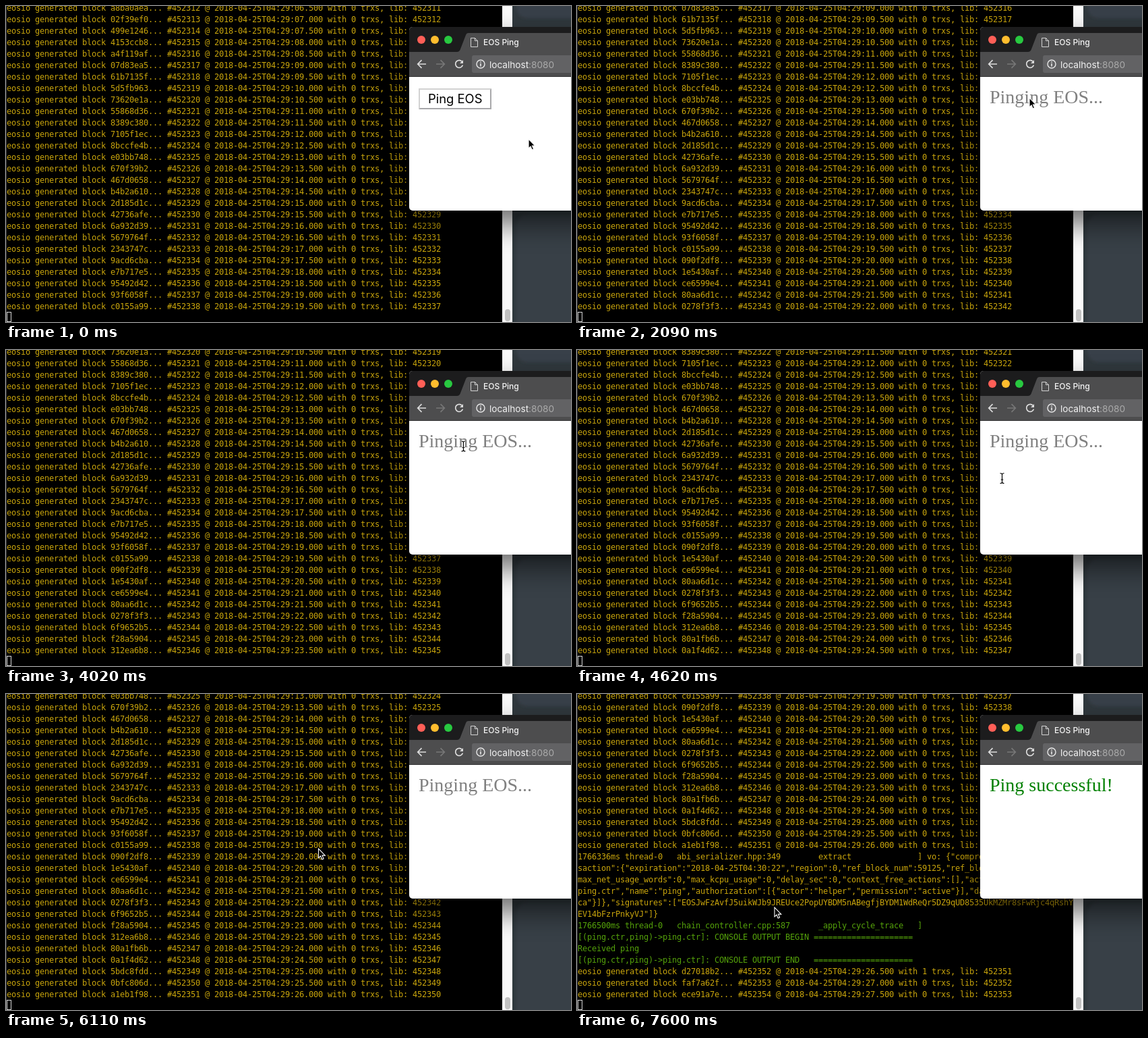
These frames come from a looping animation (838 px wide and 468 px high, 8 s). An HTML page:

```html
<!DOCTYPE html>
<html lang="en">
<head>
<meta charset="utf-8">
<title>Ping</title>
<style>
  html, body { margin: 0; width: 100%; height: 100%; overflow: hidden; background: #000; }
  svg { display: block; width: 838px; height: 468px; }
  text { white-space: pre; }
  .log { font: 12px "DejaVu Sans Mono", monospace; }
  .ui { font-family: Inter, Roboto, sans-serif; }
  .page { font: 28px "Liberation Serif", serif; }
</style>
</head>
<body>
<svg viewBox="0 0 838 468" xmlns="http://www.w3.org/2000/svg">
  <defs>
    <filter id="shade" x="-50%" y="-50%" width="200%" height="200%"><feGaussianBlur stdDeviation="20"/></filter>
    <filter id="soft"><feGaussianBlur stdDeviation="2"/></filter>
    <clipPath id="term"><rect width="736" height="468"/></clipPath>
  </defs>

  <!-- desktop -->
  <rect x="750" width="88" height="468" fill="#30383d"/>
  <rect x="757" y="-60" width="140" height="78" rx="16" fill="#394148" filter="url(#soft)"/>
  <rect x="756" y="309" width="140" height="220" rx="18" fill="#373f46" filter="url(#soft)"/>

  <!-- terminal -->
  <rect width="736" height="468"/>
  <rect width="1" height="468" fill="#3c3c3c"/>
  <g id="rows" class="log" clip-path="url(#term)"></g>
  <rect x="1.5" y="453.5" width="6" height="14" fill="none" stroke="#d8d8d8"/>
  <rect x="736" width="15" height="468" fill="#fafafa"/>
  <rect x="740" y="449" width="8" height="18" rx="4" fill="#c1c1c1"/>

  <!-- browser -->
  <rect x="598" y="51" width="330" height="272" opacity=".56" filter="url(#shade)"/>
  <rect x="598" y="31" width="260" height="272" rx="5" fill="#fff"/>
  <path d="M598 105V36a5 5 0 0 1 5-5H838V105Z" fill="#1c1c1d"/>
  <path d="M598 68H669Q672 68 673.5 65L682 43Q683 40 686 40H838V105H598Z" fill="#4d4d4e"/>
  <rect x="598" y="104" width="240" height="1" fill="#333"/>
  <circle cx="616" cy="50" r="6" fill="#ff5f57"/>
  <circle cx="636" cy="50" r="6" fill="#ffbd2e"/>
  <circle cx="656" cy="50" r="6" fill="#28c940"/>
  <path d="M689.5 47.5H695.5L699.5 51.5V60.5H689.5ZM695.5 47.5V51.5H699.5" fill="none" stroke="#d2d2d2"/>
  <text class="ui" x="708" y="58" font-size="12" font-weight="500" fill="#f4f4f4">EOS Ping</text>
  <g fill="none" stroke="#dcdcdc" stroke-width="1.7">
    <path d="M623 86H611M616.5 80.2L610.7 86L616.5 91.8"/>
    <path d="M638 86H650M644.5 80.2L650.3 86L644.5 91.8" stroke="#777"/>
    <path d="M676.3 82.2A5.5 5.5 0 1 0 677.4 87.5"/>
    <path d="M678 80V85H673Z" fill="#dcdcdc" stroke="none"/>
  </g>
  <path d="M838 73H694a3 3 0 0 0-3 3V96a3 3 0 0 0 3 3H838Z" fill="#626264"/>
  <circle cx="704" cy="86" r="6" fill="none" stroke="#e8e8e8" stroke-width="1.4"/>
  <path d="M704 85V89.5M704 82.2V83.8" stroke="#e8e8e8" stroke-width="1.6"/>
  <text class="ui" x="717" y="91.5" font-size="13.6" fill="#f2f2f2">localhost<tspan fill="#aaa">:8080</tspan></text>

  <g id="button">
    <path d="M612 153V122H720L718 124H614V151Z" fill="#d2d2d2"/>
    <path d="M612 153H720V122L718 124V151H614Z" fill="#a9a9ab"/>
    <text class="ui" x="626" y="144" font-size="18.4" fill="#000">Ping EOS</text>
  </g>
  <text id="status" class="page" x="612" y="144"></text>

  <path id="arrow" d="M0 0V13.8L3.1 11L5.2 16L7.6 15L5.5 10.1H9.8Z" fill="#000" stroke="#fff" stroke-width="1.1"/>
  <g id="beam" fill="none">
    <path d="M-3-7.5Q0-7.5 0-5.5Q0-7.5 3-7.5M0-6V6M-3 7.5Q0 7.5 0 5.5Q0 7.5 3 7.5M-1.8 2H1.8" stroke="#fff" stroke-width="2.6"/>
    <path d="M-3-7.5Q0-7.5 0-5.5Q0-7.5 3-7.5M0-6V6M-3 7.5Q0 7.5 0 5.5Q0 7.5 3 7.5M-1.8 2H1.8" stroke="#000" stroke-width="1.2"/>
  </g>
</svg>
<script>
const LOOP = 8000, STEP = 149, ROWS = 27, FIRST = 452312;
const GOLD = '#c9a50c', GREEN = '#55a30a';
const $ = id => document.getElementById(id);

const hashes = `a8ba0aea 02f39ef0 499e1246 4153ccb8 a4f119af 07d83ea5 61b7135f 5d5fb963 73620e1a
55868d36 8389c380 7105f1ec 8bccfe4b e03bb748 670f39b2 467d0658 b4b2a610 2d185d1c 42736afe
6a932d39 5679764f 2343747c 9acd6cba e7b717e5 95492d42 93f6058f c0155a99 090f2df8 1e5430af
ce6599e4 80aa6d1c 0278f3f3 6f9652b5 f28a5904 312ea6b8 80a1fb6b 0a1f4d62 5bdc8fdd 0bfc806d
a1eb1f98 d27018b2 faf7a62f ece91a7e`.split(/\s+/);

const extract = String.raw`1766336ms thread-0   abi_serializer.hpp:349        extract              ] vo: {"compression":"none",
saction":{"expiration":"2018-04-25T04:30:22","region":0,"ref_block_num":59125,"ref_block_prefix":28710345
max_net_usage_words":0,"max_kcpu_usage":0,"delay_sec":0,"context_free_actions":[],"actions":[{"account":"
ping.ctr","name":"ping","authorization":[{"actor":"helper","permission":"active"}],"data":"000000005c95b1
ca"}]},"signatures":["EOSJwFzAvfJ5uikWJb9JREUce2PopUYBDM5nABegfjBYDM1WdReQr5DZ9qUD8535UkMZMr8sFwRjc4qRshY
EV14bFzrPnkyVJ"]}`.split('\n');

const rule = '='.repeat(21);
const trace = [
  '1766500ms thread-0   chain_controller.cpp:587      _apply_cycle_trace   ]',
  '[(ping.ctr,ping)->ping.ctr]: CONSOLE OUTPUT BEGIN ' + rule,
  'Received ping',
  '[(ping.ctr,ping)->ping.ctr]: CONSOLE OUTPUT END   ' + rule
];

// Every log line with the step at which it is printed
const lines = [];
const print = (text, color, step) => lines.push({ text, color, step });
hashes.forEach((hash, i) => {
  const n = FIRST + i, late = i - ROWS;
  const trxs = n === 452352 ? 1 : 0;
  if (trxs) {
    extract.forEach(s => print(s, GOLD, 43));
    trace.forEach(s => print(s, GREEN, 44));
  }
  const sec = (6.5 + i / 2).toFixed(3).padStart(6, '0');
  print(`eosio generated block ${hash}... #${n} @ 2018-04-25T04:29:${sec} with ${trxs} trxs, lib: ${n - 1}`,
    GOLD, late < 0 ? 0 : Math.round(1 + late * 10 / 3));
});

const rows = Array.from({ length: ROWS }, (_, i) => {
  const row = document.createElementNS('http://www.w3.org/2000/svg', 'text');
  row.setAttribute('x', 1);
  row.setAttribute('y', 7 + 17 * i);
  $('rows').append(row);
  return row;
});

// Terminal cells are a whole 7 px wide
rows[0].textContent = 'm'.repeat(100);
$('rows').style.letterSpacing = 7 - rows[0].getComputedTextLength() / 100 + 'px';

// Pointer moves: first step, last step, end point
const start = [775, 197];
const moves = [
  [2, 8, 671, 136],
  [16, 18, 684, 137],
  [26, 31, 630.5, 190],
  [33, 40, 463.5, 229],
  [42, 44, 371.5, 295],
  [45, 51, 293, 316]
];

function pointer(step) {
  let [x, y] = start;
  for (const [from, to, ex, ey] of moves) {
    const p = Math.min(1, Math.max(0, (step - from) / (to - from)));
    const e = p * p * (3 - 2 * p);
    x += (ex - x) * e;
    y += (ey - y) * e;
  }
  return [x, y];
}

let shown = -1;
function draw(t) {
  const step = Math.floor((t % LOOP + 7) / STEP);
  if (step === shown) return;
  shown = step;

  const log = lines.filter(l => l.step <= step).slice(-ROWS);
  rows.forEach((row, i) => {
    row.textContent = log[i].text;
    row.setAttribute('fill', log[i].color);
  });

  const done = step >= 44, sent = step >= 12;
  $('button').style.display = sent ? 'none' : '';
  $('status').textContent = done ? 'Ping successful!' : sent ? 'Pinging EOS...' : '';
  $('status').setAttribute('fill', done ? '#008000' : '#808080');

  const [x, y] = pointer(step);
  const beam = step >= 17 && x > 598;
  $('beam').style.display = beam ? '' : 'none';
  $('arrow').style.display = beam ? 'none' : '';
  $(beam ? 'beam' : 'arrow').setAttribute('transform', `translate(${x} ${y})`);
}

const origin = performance.now();
function tick() {
  draw(performance.now() - origin);
  requestAnimationFrame(tick);
}
tick();
</script>
</body>
</html>
```
